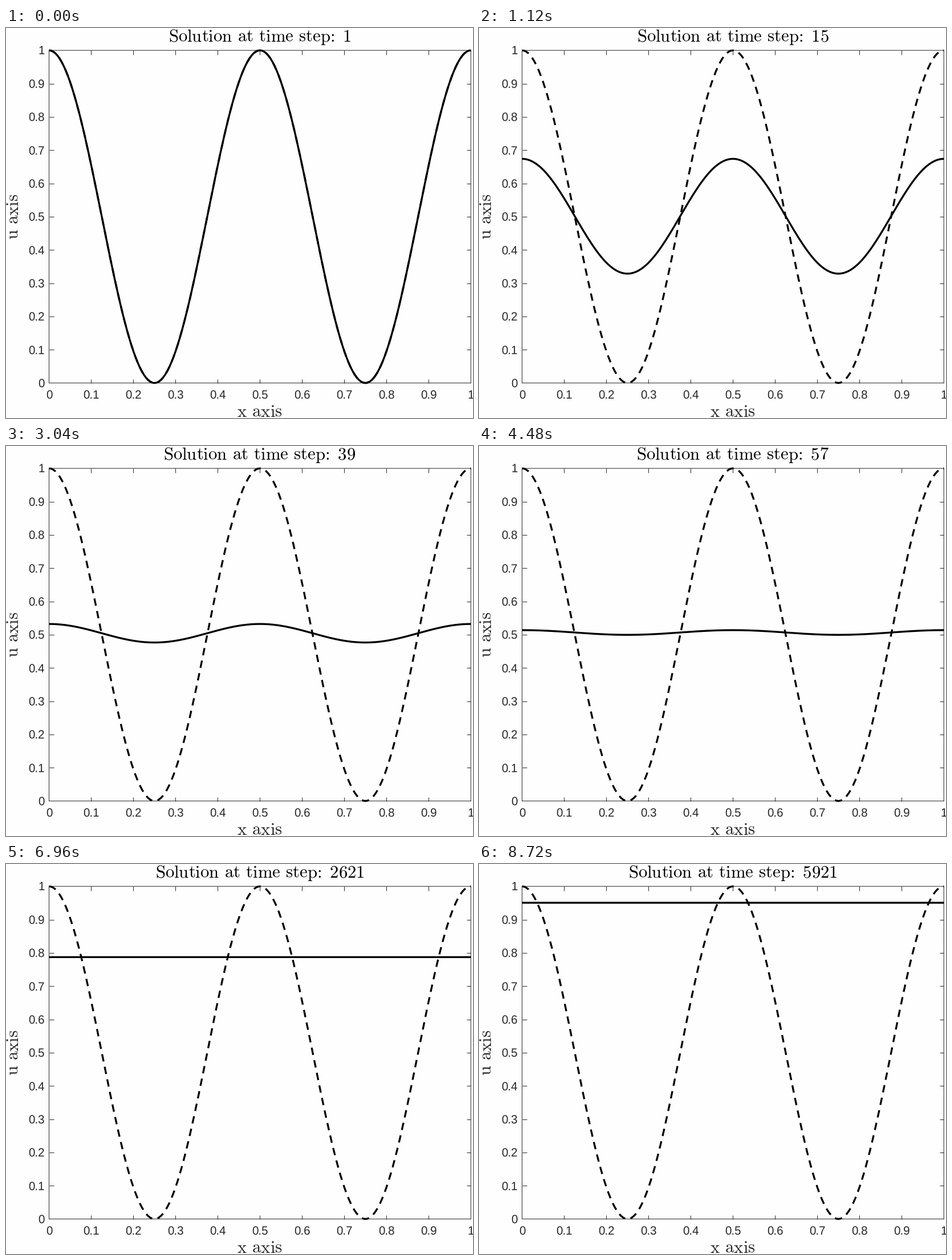
Write a matplotlib script that moves like this. It is 819 by 684 pixels and loops after 8800 ms.

```python
import numpy as np
import matplotlib.pyplot as plt
from matplotlib.animation import FuncAnimation

W, H, DPI = 819, 684, 72
LEFT, RIGHT, TOP, BOTTOM = 75.5, 815.2, 39.2, 622.6
FRAMES, INTERVAL = 110, 80
GREY = "#262626"
LATEX_PX, TICK_PX = 30.75, 20.5
LINE, DASH, GAP = 3.3, 13, 9.5

plt.rcParams.update({
    "mathtext.fontset": "cm",
    "font.family": "Liberation Sans",
    "text.hinting": "none",
})


def step_of(frame):
    """Single steps at first, then strides of 150."""
    return frame + 1 if frame <= 70 else 71 + 150 * (frame - 70)


def solve(steps, cells=200, dt=5e-4):
    """u_t = u_xx + u(1 - u), implicit diffusion, zero-flux ends."""
    x = np.linspace(0, 1, cells + 1)
    lap = (np.diag(np.full(cells + 1, -2.0))
           + np.diag(np.ones(cells), 1) + np.diag(np.ones(cells), -1))
    lap[0, 1] = lap[-1, -2] = 2
    advance = np.linalg.inv(np.eye(cells + 1) - dt * cells**2 * lap)
    u = np.cos(2 * np.pi * x) ** 2
    saved = {1: u}
    for n in range(2, max(steps) + 1):
        u = advance @ (u + dt * u * (1 - u))
        if n in steps:
            saved[n] = u
    return x, saved


def roman(text):
    """Set text in Computer Modern with its natural word spaces."""
    words = [r"\mathrm{%s}" % w for w in text.split()]
    out = r"\hspace{0.38}".join(words)
    # A colon is spaced as a relation; undo that and widen the gap after it.
    out = out.replace(r":}\hspace{0.38}", r"}\hspace{-0.2}:\hspace{0.306}")
    return f"${out}$"


def label(x, y, text, size, **kw):
    kw = {"ha": "center", "va": "baseline", "color": GREY, **kw}
    return fig.text(x / W, 1 - y / H, text, fontsize=size, **kw)


fig = plt.figure(figsize=(W / DPI, H / DPI), dpi=DPI, facecolor="#fefefe")
ax = fig.add_axes([LEFT / W, 1 - BOTTOM / H,
                   (RIGHT - LEFT) / W, (BOTTOM - TOP) / H],
                  facecolor="#fefefe")
ax.set(xlim=(0, 1), ylim=(0, 1))
ticks = np.linspace(0, 1, 11)
ax.set_xticks(ticks)
ax.set_yticks(ticks)
ax.tick_params(direction="in", length=7.5, width=1, color=GREY,
               top=True, right=True, labelbottom=False, labelleft=False)
for spine in ax.spines.values():
    spine.set(linewidth=1, color=GREY, snap=False)
# The frame itself already marks both ends of each axis.
for axis in (ax.xaxis, ax.yaxis):
    for tick in (axis.get_major_ticks()[0], axis.get_major_ticks()[-1]):
        tick.tick1line.set_visible(False)
        tick.tick2line.set_visible(False)

for t in ticks:
    name = f"{t:.1g}"
    label(LEFT + t * (RIGHT - LEFT), 650, name, TICK_PX)
    label(67.5, BOTTOM - t * (BOTTOM - TOP) + 7.3, name, TICK_PX, ha="right")

label(445, 682, roman("x axis"), LATEX_PX)
label(22, 330.5, roman("u axis"), LATEX_PX, rotation=90,
      rotation_mode="anchor")
title = label(445, 24, "", LATEX_PX, color="black")

x, states = solve({step_of(k) for k in range(FRAMES)})
style = dict(color="black", lw=LINE, clip_on=False, snap=False, zorder=3)
ax.plot(x, states[1], dashes=(DASH / LINE, GAP / LINE),
        dash_capstyle="butt", **style)
curve, = ax.plot(x, states[1], solid_capstyle="butt", **style)


def update(frame):
    n = step_of(frame)
    curve.set_ydata(states[n])
    title.set_text(roman(f"Solution at time step: {n}"))
    return curve, title


anim = FuncAnimation(fig, update, frames=FRAMES, interval=INTERVAL,
                     repeat=True, repeat_delay=0, blit=False)
plt.show()
```
